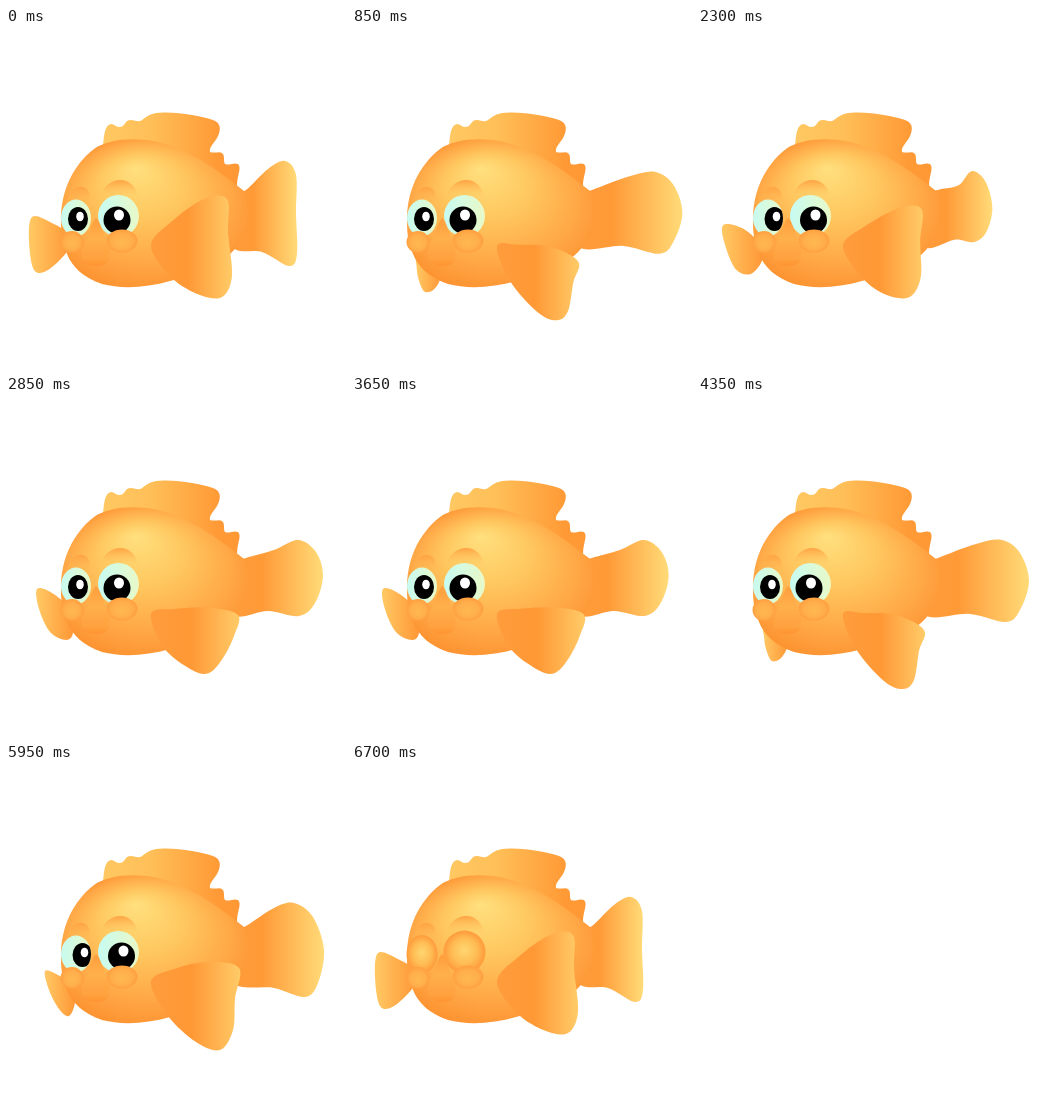
Animation, 340 px wide and 340 px high, one loop 6.8 s. Source, as an HTML page:

```html
<!DOCTYPE html>
<html lang="en">
<head>
<meta charset="utf-8">
<title>Goldfish</title>
<style>
  html, body { margin: 0; width: 100%; height: 100%; overflow: hidden; background: #fff; }
  svg { display: block; width: 100vw; height: 100vh; }
</style>
</head>
<body>
<svg viewBox="0 0 340 340">
  <defs>
    <radialGradient id="skin" gradientUnits="userSpaceOnUse" cx="0" cy="0" r="1" fx="-.16" fy="-.56"
      gradientTransform="translate(146 184) scale(108 79)">
      <stop offset="0" stop-color="#ffe07e"/>
      <stop offset=".4" stop-color="#ffc75f"/>
      <stop offset=".8" stop-color="#ffa544"/>
      <stop offset="1" stop-color="#fd9432"/>
    </radialGradient>
    <linearGradient id="dorsal">
      <stop offset="0" stop-color="#ffc862"/>
      <stop offset=".35" stop-color="#ffbf58"/>
      <stop offset=".85" stop-color="#ff9a36"/>
      <stop offset="1" stop-color="#ff9834"/>
    </linearGradient>
    <linearGradient id="tailFill">
      <stop offset="0" stop-color="#ff9c3a"/>
      <stop offset=".35" stop-color="#ff9a37"/>
      <stop offset="1" stop-color="#ffdb78"/>
    </linearGradient>
    <linearGradient id="sideFill">
      <stop offset="0" stop-color="#ff9c3c"/>
      <stop offset=".45" stop-color="#ff9835"/>
      <stop offset="1" stop-color="#ffcb68"/>
    </linearGradient>
    <linearGradient id="farFill">
      <stop offset="0" stop-color="#ffc964"/>
      <stop offset="1" stop-color="#ff9736"/>
    </linearGradient>
    <linearGradient id="eyeFill">
      <stop offset="0" stop-color="#c6fbf3"/>
      <stop offset="1" stop-color="#e9f9c6"/>
    </linearGradient>
    <radialGradient id="lidFill" cx=".5" cy=".5" r=".5" fy=".45">
      <stop offset="0" stop-color="#ffd670"/>
      <stop offset=".6" stop-color="#ffbc54"/>
      <stop offset="1" stop-color="#ff9a3a"/>
    </radialGradient>
    <radialGradient id="cheek" cx=".5" cy=".5" r=".5" fy=".6">
      <stop offset="0" stop-color="#ffb850"/>
      <stop offset=".65" stop-color="#ffaf4c"/>
      <stop offset="1" stop-color="#ff9f40"/>
    </radialGradient>
    <linearGradient id="brow" x2="0" y2="1">
      <stop offset="0" stop-color="#ffa344"/>
      <stop offset="1" stop-color="#ffc45c" stop-opacity="0"/>
    </linearGradient>
    <linearGradient id="nose" x2="0" y2="1">
      <stop offset="0" stop-color="#ff9d3c"/>
      <stop offset=".5" stop-color="#ffb04b"/>
      <stop offset="1" stop-color="#ffa03e"/>
    </linearGradient>
    <linearGradient id="lip" x2="0" y2="1">
      <stop offset="0" stop-color="#ffab48"/>
      <stop offset="1" stop-color="#ff9230"/>
    </linearGradient>
    <clipPath id="eyeL"><ellipse cx="70" cy="190" rx="15" ry="18.5"/></clipPath>
    <clipPath id="eyeR"><ellipse cx="112.5" cy="188" rx="20.5" ry="21"/></clipPath>
  </defs>

  <path id="far" fill="url(#farFill)"/>
  <path fill="url(#dorsal)" d="M97 118C98 106 99 97 105 96C109 96 109 99 113 99C120 99 118 92 125 92C130 92 131 95 136 92C142 87 147 84 160 84.5C178 85 195 88 207 92C215 95 215 101 212 108C209 115 203 118 204 124C210 126 214 122 217 126C219 130 217 133 219 136C224 138 227 134 232 136C236 140 231 147 231 158L180 150Z"/>
  <path id="tail" fill="url(#tailFill)"/>
  <path fill="url(#skin)" d="M55 195C54 165 66 138 88 121C102 111 130 109 152 114C182 121 212 142 238 163C244 178 242 202 233 216C218 237 190 247 164 253C140 260 115 261 96 256C78 250 66 239 61 226C57 217 55 207 55 195Z"/>

  <path fill="url(#brow)" d="M60 178C61 165 68 158 76 159C82 160 84 165 84 171Z"/>
  <path fill="url(#brow)" d="M95 168C98 157 106 152 114 152C123 152 130 158 132 169Z"/>

  <g clip-path="url(#eyeL)">
    <rect x="54" y="170" width="32" height="40" fill="url(#eyeFill)"/>
    <g class="pupil">
      <ellipse cx="72" cy="191" rx="10" ry="12"/>
      <ellipse cx="74" cy="188.500" rx="3.800" ry="4.800" fill="#fff"/>
    </g>
  </g>
  <g clip-path="url(#eyeR)">
    <rect x="91" y="166" width="43" height="44" fill="url(#eyeFill)"/>
    <g class="pupil">
      <ellipse cx="111" cy="192" rx="13.500" ry="13.500"/>
      <ellipse cx="113" cy="187" rx="5" ry="5.500" fill="#fff"/>
    </g>
  </g>
  <ellipse class="lid" data-top="170" cx="70" cy="190" rx="15.500" ry="19" fill="url(#lidFill)"/>
  <ellipse class="lid" data-top="166" cx="112.500" cy="188" rx="21" ry="21.500" fill="url(#lidFill)"/>

  <ellipse cx="66" cy="214" rx="11.500" ry="11" fill="url(#cheek)"/>
  <ellipse cx="116" cy="213" rx="15.500" ry="11.500" fill="url(#cheek)"/>
  <path fill="url(#lip)" d="M76 229C82 226 98 226 104 228C103 235 97 238 90 238C83 238 78 235 76 229Z"/>
  <path fill="url(#nose)" d="M90 190C95 194 97 206 102 217C106 225 103 230 96 229C92 232 86 232 83 229C77 230 73 226 77 219C82 209 85 196 90 190Z"/>
  <path id="side" fill="url(#sideFill)"/>
</svg>
<script>
  const LOOP = 6800, TICK = 50;

  // Stroke poses, in swim order, with their place in the cycle.
  const stops = [0, .11, .33, .45, .67, 1];
  const fins = {
    tail: {
      root: [[226, 218], [226, 168], [240, 162]],
      poses: [
        '262 141 279 133 290 147 290 185 291 226 283 238 256 224',
        '268 144 288 139 307 153 318 186 312 219 299 233 268 224',
        '278 148 304 144 322 157 331 185 322 214 308 226 272 218',
        '268 154 292 144 310 156 317 180 309 207 293 220 262 215',
        '259 158 270 143 283 153 290 180 284 204 272 213 256 211'
      ]
    },
    side: {
      root: [[145, 218]],
      poses: [
        '165 194 198 171 221 171 222 205 226 248 216 269 194 267 166 250',
        '168 205 202 198 233 204 229 235 227 266 214 286 190 278 162 252',
        '166 217 198 219 226 234 221 255 216 284 205 293 186 285 158 253',
        '168 213 204 212 232 219 228 240 217 262 203 277 186 274 158 252',
        '166 196 200 174 222 174 221 208 224 246 214 267 190 266 166 250'
      ]
    },
    far: {
      root: [],
      poses: [
        '62 206 44 194 26 189 23 213 28 242 42 242 62 222',
        '66 222 52 211 39 207 43 226 53 245 63 252 69 238',
        '80 225 66 232 66 240 68 253 74 265 84 261 90 245',
        '62 212 46 197 31 193 33 213 44 236 60 244 67 236',
        '60 215 44 201 24 198 26 218 37 243 52 246 64 230'
      ]
    }
  };

  // Time in ms against swim cycles done, and the eye movements.
  const swim = [[0, 0], [50, 0], [1650, 2.67], [2850, 4.45], [4350, 6.33],
    [5250, 7.45], [5950, 8.11], [6700, 9], [LOOP, 9]];
  const look = [[0, 0], [1100, 0], [1300, 1], [2300, 1], [2500, 0],
    [5450, 0], [5650, 1], [6300, 1], [6450, 0], [LOOP, 0]];
  const blink = [[0, 0], [6450, 0], [6650, 1], [LOOP, 1]];

  const mix = (a, b, k) => a + (b - a) * k;

  function track(keys, t) {
    let i = 1;
    while (i < keys.length - 1 && t > keys[i][0]) i++;
    const [t0, v0] = keys[i - 1], [t1, v1] = keys[i];
    return mix(v0, v1, (t - t0) / (t1 - t0));
  }

  // Smooth closed curve through the points.
  function curve(pts) {
    const n = pts.length, at = i => pts[(i + n) % n];
    let d = 'M' + pts[0];
    for (let i = 0; i < n; i++) {
      const [a, b, c, e] = [at(i - 1), at(i), at(i + 1), at(i + 2)];
      const p = [0, 1].map(j => b[j] + (c[j] - a[j]) / 6);
      const q = [0, 1].map(j => c[j] - (e[j] - b[j]) / 6);
      d += `C${p} ${q} ${c}`;
    }
    return d + 'Z';
  }

  for (const [id, fin] of Object.entries(fins)) {
    fin.el = document.getElementById(id);
    fin.poses = fin.poses.map(s => s.split(' ').map(Number));
  }
  const pupils = document.querySelectorAll('.pupil');
  const lids = document.querySelectorAll('.lid');

  function drawFin({ el, root, poses }, phase) {
    let i = 0;
    while (phase > stops[i + 1]) i++;
    const k = (phase - stops[i]) / (stops[i + 1] - stops[i]);
    const next = poses[(i + 1) % poses.length];
    const flat = poses[i].map((v, j) => mix(v, next[j], k));
    const pts = [...root];
    for (let j = 0; j < flat.length; j += 2) pts.push([flat[j], flat[j + 1]]);
    el.setAttribute('d', curve(pts));
  }

  function draw(t) {
    const phase = track(swim, t) % 1;
    Object.values(fins).forEach(fin => drawFin(fin, phase));

    const shift = track(look, t);
    pupils.forEach(p => p.setAttribute('transform', `translate(${shift * 4.5} 0)`));

    const shut = track(blink, t);
    lids.forEach(lid => {
      const top = +lid.dataset.top;
      lid.setAttribute('transform', `translate(0 ${top}) scale(1 ${shut}) translate(0 ${-top})`);
      lid.setAttribute('visibility', shut > 0 ? 'visible' : 'hidden');
    });
  }

  const start = performance.now();
  function frame() {
    const t = (performance.now() - start) % LOOP;
    draw(Math.floor(t / TICK) * TICK);
    requestAnimationFrame(frame);
  }
  frame();
</script>
</body>
</html>
```
